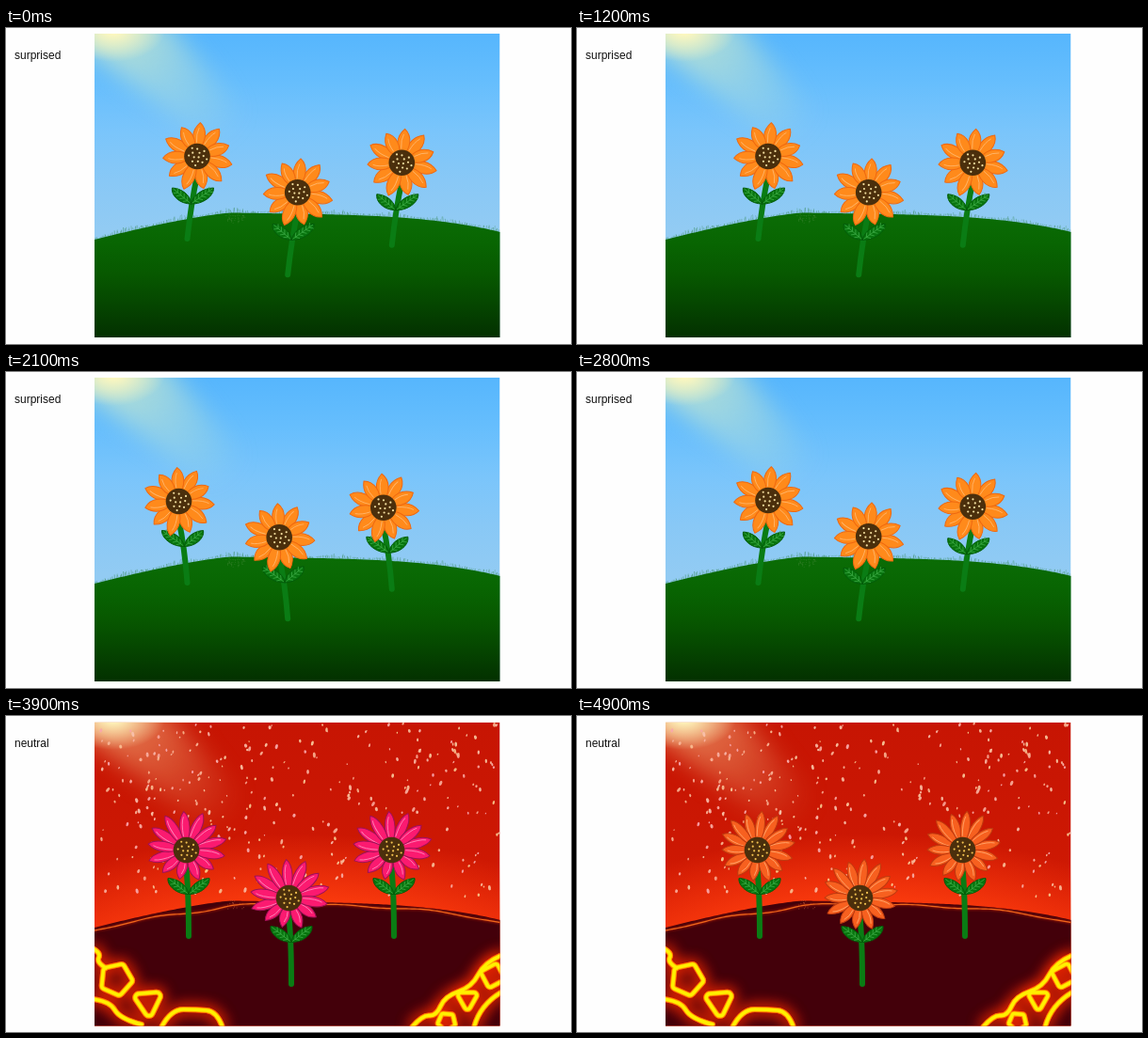
Write an HTML page with a canvas that moves like this. It is 600 px wide and 336 px high and loops after 5000 ms.

```html
<!DOCTYPE html>
<html lang="en">
<head>
<meta charset="utf-8">
<title>Swaying flowers</title>
<style>
html, body { margin: 0; width: 100%; height: 100%; overflow: hidden; background: #fefefe; }
canvas { position: absolute; left: 0; top: 0; }
#mood { position: absolute; left: 9px; top: 22px; font: 12px/14px "Liberation Sans", Arial, sans-serif; color: #111; }
</style>
</head>
<body>
<canvas id="stage" width="600" height="336"></canvas>
<div id="mood">surprised</div>
<script>
const W = 600, H = 336, LOOP = 5000, SWITCH = 3800, STEP = 100;
const LEFT = 94, RIGHT = 524.5, TAU = Math.PI * 2;
const view = document.getElementById('stage').getContext('2d');
const mood = document.getElementById('mood');

function random(seed) {
  return () => (seed = (seed * 16807) % 2147483647) / 2147483647;
}

// Rounded path through the midpoints of a polyline
function smooth(g, pts) {
  g.moveTo(...pts[0]);
  for (let i = 1; i < pts.length - 1; i++) {
    const [x, y] = pts[i], [nx, ny] = pts[i + 1];
    const last = i === pts.length - 2;
    g.quadraticCurveTo(x, y, last ? nx : (x + nx) / 2, last ? ny : (y + ny) / 2);
  }
}

function ramp(g, y0, y1, colors) {
  const grad = g.createLinearGradient(0, y0, 0, y1);
  colors.forEach((c, i) => grad.addColorStop(i / (colors.length - 1), c));
  return grad;
}

// Radial glow stretched to an ellipse, from the inner radius share outwards
function glow(g, x, y, rx, ry, inner, rgb, alpha = 1) {
  g.save();
  g.translate(x, y);
  g.scale(rx, ry);
  const grad = g.createRadialGradient(0, 0, inner, 0, 0, 1);
  grad.addColorStop(0, `rgba(${rgb},${alpha})`);
  grad.addColorStop(0.5, `rgba(${rgb},${alpha * 0.5})`);
  grad.addColorStop(1, `rgba(${rgb},0)`);
  g.fillStyle = grad;
  g.beginPath();
  g.arc(0, 0, 1, 0, TAU);
  g.fill();
  g.restore();
}

function layer(paint) {
  const c = document.createElement('canvas');
  c.width = W; c.height = H;
  const g = c.getContext('2d');
  g.lineCap = g.lineJoin = 'round';
  paint(g);
  return c;
}

function sky(g, top, bottom, colors) {
  g.beginPath();
  g.rect(LEFT, top, RIGHT - LEFT, bottom - top);
  g.clip();
  g.fillStyle = ramp(g, top, 215, colors);
  g.fillRect(LEFT, top, RIGHT - LEFT, bottom - top);
}

function sunlight(g, tint, strength) {
  g.save();
  g.filter = 'blur(13px)';
  const beam = g.createLinearGradient(115, 0, 240, 110);
  beam.addColorStop(0, `rgba(${tint},${strength})`);
  beam.addColorStop(0.5, `rgba(${tint},${strength * 0.5})`);
  beam.addColorStop(1, `rgba(${tint},0)`);
  g.fillStyle = beam;
  g.beginPath();
  g.moveTo(80, -12);
  g.lineTo(165, -12);
  g.lineTo(265, 105);
  g.lineTo(215, 120);
  g.lineTo(80, 18);
  g.fill();
  g.restore();
  glow(g, 114, 2, 55, 34, 0.1, '255,248,190');
}

function ridge(x) {
  const u = x < 240 ? (240 - x) / 146 : (x - 240) / 285;
  return 196.5 + (x < 240 ? 28.5 * u ** 1.3 : 4 * u + 16.5 * u ** 4);
}

function traceRidge(g, offset = () => 0) {
  g.beginPath();
  for (let x = LEFT - 2; x <= RIGHT + 4; x += 3) g.lineTo(x, ridge(x) + offset(x));
}

function fillHill(g, style) {
  traceRidge(g);
  g.lineTo(RIGHT + 4, H);
  g.lineTo(LEFT - 2, H);
  g.fillStyle = style;
  g.fill();
}

function speckle(g, rnd, count, color) {
  g.fillStyle = color;
  for (let i = 0; i < count; i++) {
    const a = rnd() * TAU, r = Math.sqrt(rnd());
    g.fillRect(243 + 11 * r * Math.cos(a), 201 + 6 * r * Math.sin(a), 1, 1);
  }
}

const meadow = layer(g => {
  const rnd = random(71);
  sky(g, 6, 329, ['#56b6fd', '#66befd', '#7ac5fb', '#88c8f6', '#92cbf3']);
  sunlight(g, '200,232,205', 0.85);
  g.lineWidth = 0.7;
  for (let x = LEFT; x < RIGHT; x += 1.8) {
    const y = ridge(x), tall = 1.5 + 4 * rnd() * (0.5 + 0.5 * Math.sin(x / 9));
    g.strokeStyle = `rgba(45,130,70,${0.25 + 0.45 * rnd()})`;
    g.beginPath();
    g.moveTo(x, y + 1);
    g.lineTo(x + rnd() * 3 - 1.5, y - tall);
    g.stroke();
  }
  fillHill(g, ramp(g, 196, 329, ['#0b6d06', '#086502', '#075800', '#054500', '#033000']));
  speckle(g, rnd, 55, 'rgba(95,150,80,.3)');
});

// Rounded polygon cell of cooled rock
function cell(g, x, y, r, sides, turn) {
  const at = i => {
    const a = turn + i * TAU / sides;
    return [x + r * Math.cos(a), y + r * Math.sin(a)];
  };
  const [sx, sy] = at(0.5), k = Math.cos(Math.PI / sides);
  g.moveTo(x + (sx - x) * k, y + (sy - y) * k);
  for (let i = 1; i <= sides; i++) g.arcTo(...at(i), ...at(i + 1), r * 0.22);
  g.closePath();
}

function veins(g) {
  g.beginPath();
  cell(g, 117, 280, 18, 5, 0.1);
  cell(g, 151, 304, 19, 3, -0.6);
  cell(g, 490, 301, 14, 3, Math.PI / 2);
  cell(g, 517, 276, 14, 4, 0.3);
  cell(g, 468, 325, 10, 5, 0.4);
  smooth(g, [[92, 247], [101, 252], [96, 262], [106, 268]]);
  smooth(g, [[92, 301], [110, 303], [121, 322], [144, 328]]);
  smooth(g, [[165, 331], [175, 312], [202, 312], [224, 314], [230, 331]]);
  smooth(g, [[431, 331], [442, 318], [457, 319], [466, 298], [495, 288], [508, 262], [527, 254]]);
  smooth(g, [[497, 331], [503, 307], [527, 293]]);
  g.stroke();
}

const inferno = layer(g => {
  const rnd = random(4207);
  sky(g, 6.7, 329.6, ['#c71503', '#c91603', '#cd1803', '#d51b04']);
  glow(g, 310, 330, 400, 205, 0.6, '255,62,14');
  sunlight(g, '240,160,110', 0.75);
  for (let i = 0; i < 480; i++) {
    const x = LEFT + rnd() * 430, y = 7 + rnd() * 188, size = 0.6 + rnd();
    if (rnd() < y / 300) continue;
    g.fillStyle = `rgba(250,${165 + rnd() * 45 | 0},${140 + rnd() * 40 | 0},.9)`;
    g.beginPath();
    g.ellipse(x, y, size, size * (1.2 + rnd() * 0.8), rnd() - 0.3, 0, TAU);
    g.fill();
  }
  fillHill(g, '#43000a');
  g.shadowColor = '#ff3000';
  g.shadowBlur = 3;
  g.strokeStyle = '#ee681c';
  g.lineWidth = 1.2;
  traceRidge(g, x => 3 + 4 * Math.exp(-(((x - 205) / 45) ** 2)) + Math.sin(x / 15));
  g.stroke();
  g.shadowBlur = 0;
  speckle(g, rnd, 16, 'rgba(215,110,70,.5)');

  g.shadowColor = '#ff2a00';
  g.shadowBlur = 15;
  g.strokeStyle = '#ff5a00';
  g.lineWidth = 6;
  veins(g);
  veins(g);
  g.shadowBlur = 0;
  g.strokeStyle = '#ffa800';
  g.lineWidth = 5;
  veins(g);
  g.strokeStyle = '#fff000';
  g.lineWidth = 3.5;
  veins(g);
});

function petal(g, x, y, c) {
  const len = Math.hypot(x, y), w = c.width;
  g.save();
  g.rotate(Math.atan2(y, x));
  g.beginPath();
  g.moveTo(7, 0);
  g.bezierCurveTo(15, -w, len - 9, -w - 1, len, 0);
  g.bezierCurveTo(len - 7, w + 1, 15, w, 7, 0);
  g.fillStyle = c.fill;
  g.fill();
  g.strokeStyle = c.edge;
  g.lineWidth = 1;
  g.stroke();
  g.strokeStyle = c.light;
  g.lineWidth = 0.9;
  g.beginPath();
  g.moveTo(15, -2);
  g.quadraticCurveTo(len - 12, -3.4, len - 6, -0.8);
  g.stroke();
  g.restore();
}

function leaf(g, [x, y], dx, dy) {
  const len = Math.hypot(dx, dy);
  g.save();
  g.translate(x, y);
  g.rotate(Math.atan2(dy, dx));
  g.scale(1, Math.sign(dx));
  g.beginPath();
  g.moveTo(0, 0);
  g.bezierCurveTo(len * 0.25, -7, len * 0.7, -6, len, 0);
  g.bezierCurveTo(len * 0.85, 7, len * 0.35, 8, 0, 0);
  g.fillStyle = '#08740e';
  g.fill();
  g.strokeStyle = '#055c0b';
  g.lineWidth = 0.9;
  g.stroke();
  g.strokeStyle = '#3fae48';
  g.lineWidth = 0.7;
  g.beginPath();
  g.moveTo(2, 0);
  g.lineTo(len - 2, 0);
  for (let d = 5; d < len - 5; d += 4.5) {
    g.moveTo(d + 3, -3.4);
    g.lineTo(d, 0);
    g.lineTo(d + 3, 3.4);
  }
  g.stroke();
  g.restore();
}

function disk(g, seed) {
  g.fillStyle = '#4b2f0c';
  g.beginPath();
  g.arc(0, 0, 13.8, 0, TAU);
  g.fill();
  g.fillStyle = seed;
  for (let i = 0; i < 14; i++) {
    const a = i * 2.4 + 0.5, r = 2.9 * Math.sqrt(i + 0.4);
    g.beginPath();
    g.arc(r * Math.cos(a), r * Math.sin(a), 1.1, 0, TAU);
    g.fill();
  }
}

function flower(g, p) {
  const [hx, hy] = p.head, [jx, jy] = p.joint;
  g.strokeStyle = '#0a7c14';
  g.lineWidth = 6;
  g.beginPath();
  g.moveTo(hx, hy + 20);
  g.quadraticCurveTo(jx, jy, ...p.foot);
  g.stroke();
  for (const side of [-1, 1]) leaf(g, p.joint, side * 22 + p.lean, -17);

  g.save();
  g.translate(hx, hy);
  const { count, turn, rx, ry, lift } = p.petals;
  for (const parity of [1, 0]) {
    for (let i = parity; i < count; i += 2) {
      const a = turn + i * TAU / count, reach = 1 + 0.04 * Math.sin(i * 2.3);
      petal(g, rx * reach * Math.cos(a), ry * reach * Math.sin(a) - lift, p.color);
    }
  }
  disk(g, p.color.seed);
  g.restore();
}

const amber = { fill: '#ff8a1b', edge: '#ef6810', light: '#ffb467', seed: '#f3dfa0', width: 8 };
const pink = { fill: '#fb1a70', edge: '#9c1157', light: '#ff83b8', seed: '#f0c050', width: 6.5 };
const teal = { fill: '#25f3ad', edge: '#0b8270', light: '#86ffd8', seed: '#f0c050', width: 8.5 };
const rust = { fill: '#f7601f', edge: '#bd3a10', light: '#ffa368', seed: '#f0c050', width: 6 };

const swayPose = (head, joint, lean, turn) => ({
  color: amber, head, joint, lean, foot: [192.5, 224],
  petals: { count: 11, turn, rx: 37, ry: 36, lift: 0 }
});
const bloomPose = (color, head, count, turn, rx, ry, lift) => ({
  color, head, joint: [194, 189.5], lean: 0, foot: [194, 234],
  petals: { count, turn, rx, ry, lift }
});

const sway = [
  swayPose([203, 136.5], [196.5, 187], 2, -1.48),
  swayPose([183.5, 137.5], [189.5, 185.5], -2, -1.62)
];
const bloom = [
  bloomPose(pink, [191.5, 142.5], 13, -1.64, 42, 36.5, 4.5),
  bloomPose(rust, [191.5, 142.5], 14, -1.45, 39, 37.5, 4),
  bloomPose(teal, [190.5, 140], 12, -1.71, 43, 40, 3)
];

function scene(back, spots, pose) {
  return layer(g => {
    g.drawImage(back, 0, 0);
    for (const [x, y] of spots) {
      g.save();
      g.translate(x, y);
      flower(g, pose);
      g.restore();
    }
  });
}

const calm = sway.map(p => scene(meadow, [[0, 0], [217.3, 6.7], [106.7, 38.3]], p));
const fiery = bloom.map(p => scene(inferno, [[0, 0], [218, 0], [109, 51]], p));

function draw(now) {
  const t = now % LOOP, k = Math.floor(t / STEP), hot = t >= SWITCH;
  const word = hot ? 'neutral' : 'surprised';
  if (mood.textContent !== word) mood.textContent = word;
  view.clearRect(0, 0, W, H);
  view.drawImage(hot ? fiery[k % 3] : calm[k % 2], 0, 0);
}

const start = performance.now();
function tick() {
  draw(performance.now() - start);
  requestAnimationFrame(tick);
}
tick();
</script>
</body>
</html>
```
